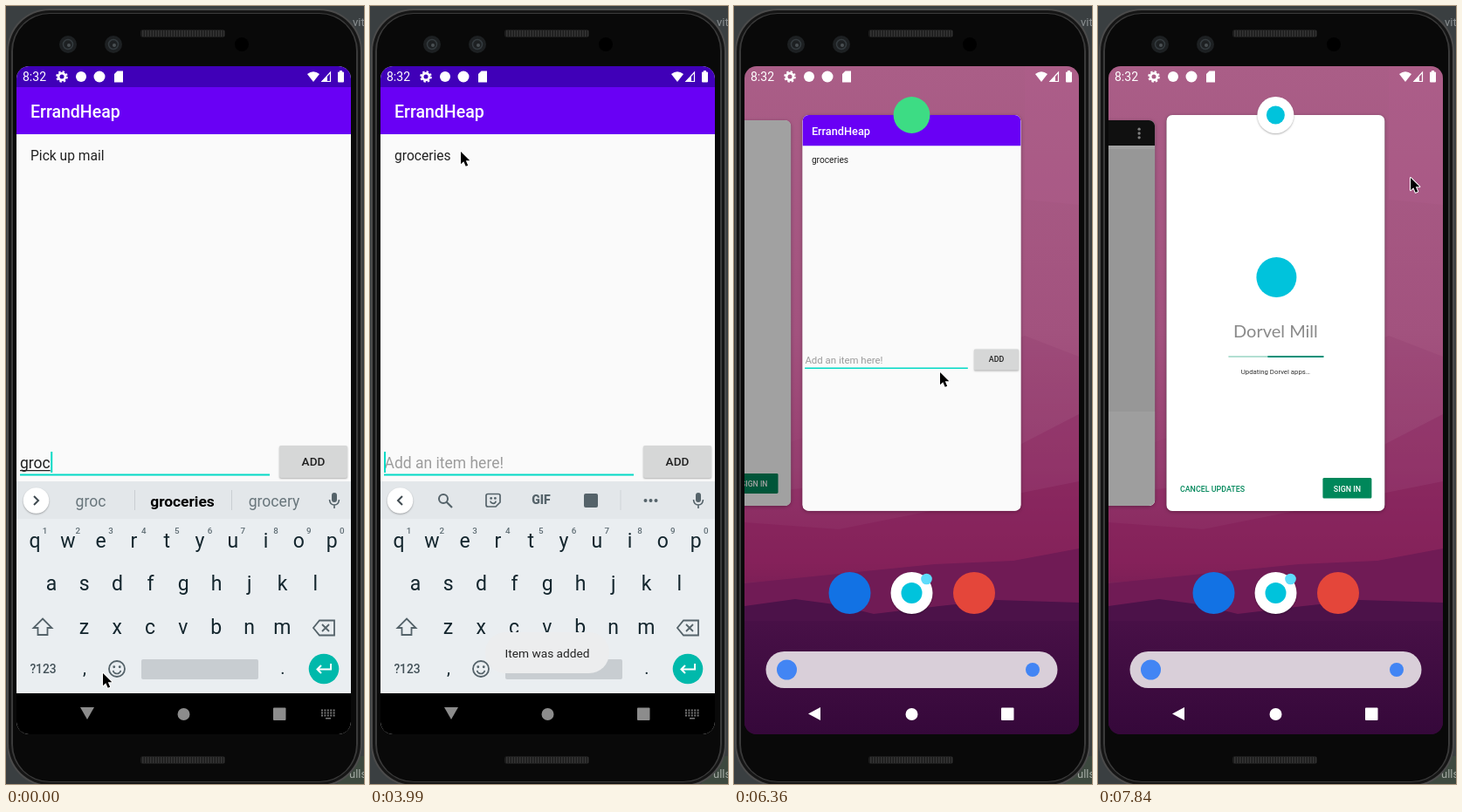
An HTML page with a canvas that plays this animation: 410x892 px, repeating every 7.99 s.

```html
<!DOCTYPE html>
<html lang="en">
<head>
<meta charset="utf-8">
<title>To-do app on a phone</title>
<style>
  html, body { margin: 0; width: 100%; height: 100%; overflow: hidden; background: #3a3f41; }
  canvas { display: block; width: 410px; height: 892px; }
</style>
</head>
<body>
<canvas id="stage"></canvas>
<script>
const LOOP = 7990, TICK = 147.8, LAST_TICK = 53;
const INK = '#212121', KEY = '#14262e', ICON = '#55636a', TEAL = '#03dac5', GREEN = '#00875a';
const canvas = document.getElementById('stage');
const ctx = canvas.getContext('2d');
const ratio = window.devicePixelRatio || 1;
canvas.width = 410 * ratio;
canvas.height = 892 * ratio;

// Drawing helpers
function text(s, x, y, size, color, { weight = 400, align = 'left', family = 'Roboto' } = {}) {
  ctx.font = `${weight} ${size}px ${family}, sans-serif`;
  ctx.textAlign = align;
  ctx.fillStyle = color;
  ctx.fillText(s, x, y);
}
const centered = (s, x, y, size, color, weight) => text(s, x, y, size, color, { weight, align: 'center' });
function fill(path, color) { ctx.fillStyle = color; ctx.fill(new Path2D(path)); }
function line(path, color, width = 2) {
  ctx.strokeStyle = color;
  ctx.lineWidth = width;
  ctx.stroke(new Path2D(path));
}
function rect(x, y, w, h, color, r = 0) {
  ctx.fillStyle = color;
  ctx.beginPath();
  ctx.roundRect(x, y, w, h, r);
  ctx.fill();
}
function disc(x, y, r, color) {
  ctx.fillStyle = color;
  ctx.beginPath();
  ctx.arc(x, y, r, 0, 7);
  ctx.fill();
}
function ring(x, y, r, color, width) {
  ctx.strokeStyle = color;
  ctx.lineWidth = width;
  ctx.beginPath();
  ctx.arc(x, y, r, 0, 7);
  ctx.stroke();
}
function clip(x, y, w, h, r = 0) {
  ctx.beginPath();
  ctx.roundRect(x, y, w, h, r);
  ctx.clip();
}
function scoped(draw) { ctx.save(); draw(); ctx.restore(); }
function shadowed(blur, draw) {
  scoped(() => {
    ctx.shadowColor = 'rgba(0,0,0,.3)';
    ctx.shadowBlur = blur * ratio;
    ctx.shadowOffsetY = ratio;
    draw();
  });
}

// Linear interpolation through [tick, ...values] keys
function track(keys, n) {
  const i = keys.findIndex(k => k[0] > n);
  if (i < 0) return keys.at(-1).slice(1);
  if (i === 0) return keys[0].slice(1);
  const [a, b] = [keys[i - 1], keys[i]], f = (n - a[0]) / (b[0] - a[0]);
  return a.slice(1).map((v, j) => v + (b[j + 1] - v) * f);
}
const POINTER = [
  [6, 111, 765], [9, 235, 640], [11, 358, 521], [14, 358, 520], [15, 290, 440], [16, 174, 349],
  [17, 174, 349], [18, 140, 210], [19, 113, 147], [20, 107, 155], [22, 104, 167], [27, 104, 167],
  [31, 256, 400], [32, 256, 400], [33, 265, 413], [38, 305, 817], [40, 305, 817], [43, 236, 420],
  [44, 236, 420], [45, 236, 397], [46, 237, 304], [47, 238, 163], [49, 280, 50], [51, 308, 16],
  [52, 308, 16], [53, 358, 197]];
const RECENTS = [[39, 0], [40, .016], [41, .4], [42, .85], [43, 1]];
const DISMISS = [[44, 0], [45, .04], [46, .2], [47, .442], [48, .72], [49, .92], [50, 1]];

function phoneBody() {
  rect(0, 0, 410, 892, '#3a3f41');
  rect(380, 860, 30, 32, '#3d493f');
  text('vit', 397, 23, 13, '#8b9092');
  text('ulls', 393, 885, 13, '#a3aaa3');
  rect(1, 3, 407, 892, '#4b4b4b', 49);
  rect(3, 5, 403, 888, '#151515', 47);
  rect(6, 8, 397, 882, '#3a3a3a', 44);
  rect(8, 9, 393, 880, '#090909', 42);
  for (const y of [32, 865]) {
    rect(154, y - 5, 97, 9, '#1c1c1c', 3);
    scoped(() => {
      ctx.setLineDash([1.5, 1.5]);
      line(`M156 ${y - .5}H250`, '#343434', 7);
    });
  }
  for (const x of [71, 123]) {
    disc(x, 44, 10, '#1d2022');
    ring(x, 44, 5.5, '#343b3f', 1.5);
    disc(x + 1, 45, 2, '#4a5053');
  }
  disc(270, 44, 8, '#000');
}

function statusIcons() {
  const white = '#fff';
  text('8:32', 19, 86, 14, white);
  ring(64, 81, 3.9, white, 2.8);
  scoped(() => { ctx.setLineDash([2.4, 2.15]); ring(64, 81, 5.8, white, 2); });
  disc(86, 81, 6, white);
  disc(107, 81, 6.5, white);
  fill('M127.5 74.5H134V87.5H124V78Z', white);
  fill('M345 78Q352 72.5 359 78L352 87Z', white);
  line('M371.5 76V86.5H362Z', white, 1.2);
  fill('M368 80V87H361Z', white);
  rect(380, 75.5, 7, 12, white, 1);
  rect(382, 74, 3, 2, white);
}

function navIcons(n) {
  const color = n < 39 ? '#8c8c8c' : '#fff';
  if (n >= 39 && n < 42) rect(264, 788, 99, 47, 'rgba(255,255,255,.13)', 23);
  fill(n < 43 ? 'M85 804H101L93 818Z' : 'M99 804V819L85 811.5Z', color);
  disc(203.5, 812, 7, color);
  rect(306, 804.5, 14.5, 14.5, color, 1);
  if (n < 40) {
    scoped(() => {
      ctx.setLineDash([2, 1.4]);
      for (const y of [807.5, 810.5, 813.5]) line(`M361 ${y}H377`, '#777', 2);
    });
    rect(366, 816, 6, 1.5, '#777');
  }
}

function smiley(x, y, r) {
  disc(x - r * .36, y - r * .25, 1.4, ICON);
  disc(x + r * .36, y - r * .25, 1.4, ICON);
  ctx.beginPath();
  ctx.arc(x, y + 1, r * .5, .2, Math.PI - .2);
  ctx.strokeStyle = ICON;
  ctx.lineWidth = 1.7;
  ctx.stroke();
}

function suggestionStrip(n, word) {
  rect(12, 545, 383, 43, '#e3e7ea');
  shadowed(2, () => disc(34.5, 567, 14.8, '#fff'));
  line(word ? 'M32 562L37 567L32 572' : 'M37 562L32 567L37 572', '#3f4a50', 2);
  rect(373, 558, 6, 11, ICON, 3);
  line('M370.5 566Q371 572 376 572T381.5 566M376 572V576', ICON, 1.6);
  if (word && n < 5) {
    centered(word, 97, 573.5, 17.6, '#69767c');
    centered('groceries', 202, 573.5, 17.4, '#000', 700);
    centered('grocery', 307, 573.5, 17.6, '#69767c');
    line('M147.5 555V578M258.5 555V578', '#c9ced2', 1);
  } else if (word) {
    centered(word, 202.5, 573.5, 17.6, '#69767c');
  } else {
    ring(84, 565, 5, ICON, 2);
    line('M87.5 568.5L94 575', ICON, 2.2);
    line('M135 559.5H147Q149 559.5 149 561.5V569L144 574H135Q133 574 133 572V561.5Q133 559.5 135 559.5Z', ICON, 1.7);
    smiley(141, 566, 6.5);
    centered('GIF', 196, 571, 14, ICON, 900);
    rect(245, 559, 16, 16, ICON, 2);
    line('M287 555V578', '#cfd4d7', 1);
    for (const x of [315.5, 321.5, 327.5]) disc(x, 567, 2, ICON);
  }
}

function keyboard(n, word) {
  rect(12, 545, 383, 243, '#eaeef1');
  suggestionStrip(n, word);
  const rows = [['qwertyuiop', 33, 621], ['asdfghjkl', 52, 670], ['zxcvbnm', 89.5, 719.5]];
  for (const [keys, x, y] of rows)
    [...keys].forEach((key, i) => centered(key, x + i * 37.8, y, 23, KEY));
  for (let i = 0; i < 10; i++) centered((i + 1) % 10, 44.5 + i * 37.8, 605, 9.8, '#5f6d74', 500);
  line('M42 702.5L52.5 713H47.5V721H36.5V713H31.5Z', ICON, 1.8);
  line('M359 704.5H376V721.5H359L352 713ZM362 709L370 717M370 709L362 717', ICON, 1.8);
  centered('?123', 42.5, 765, 13.8, '#445259', 500);
  centered(',', 90, 766, 20, KEY);
  centered('.', 317, 766, 20, KEY);
  ring(127, 760, 9, ICON, 1.8);
  smiley(127, 760, 9);
  rect(155, 749, 134, 23, '#c8cdd1', 2);
  disc(364, 760, 17.3, '#00b9ab');
  line('M372 754V760.5H357M361 756L356.5 760.5L361 765', '#fff', 2);
}

function toast(message, halfWidth, alpha) {
  scoped(() => {
    ctx.globalAlpha = alpha;
    rect(203 - halfWidth, 718, halfWidth * 2, 47, '#ecedee', 23);
    centered(message, 203, 746.5, 13.7, '#242424');
  });
}

function inputRow(n, word) {
  if (word) {
    text(word, 16, 530, 17.5, INK);
    rect(16, 532, ctx.measureText(word).width, 1.2, INK);
  } else {
    text('Add an item here!', 16.5, 530, 17.5, '#9c9c9c');
  }
  const caret = word ? 16.5 + ctx.measureText(word).width : 16;
  const sinceTyped = n * TICK - 750;
  if (n < 39 && (sinceTyped < 0 || sinceTyped % 1000 < 500)) rect(caret, 511, 2, 24, TEAL);
  rect(16, 536.5, 286, 2, TEAL);

  const pressed = n === 12 || n === 13;
  shadowed(pressed ? 5 : 2, () => rect(313, 504, 78, 37, '#d6d7d7', 2));
  if (pressed) scoped(() => {
    clip(313, 504, 78, 37, 2);
    disc(361, 522, n === 12 ? 27 : 48, '#c3c4c4');
  });
  centered('ADD', 352, 527, 13.6, INK, 500);
}

function app(n) {
  const word = n < 14 ? 'groceries'.slice(0, 4 + Math.min(n, 5)) : '';
  const items = n < 14 ? ['Pick up mail'] : n < 26 ? ['Pick up mail', 'groceries'] : ['groceries'];
  rect(12, 69, 383, 766, '#fafafa');
  rect(12, 93, 383, 54, '#6900f5');
  rect(12, 69, 383, 24, '#4000b8');
  text('ErrandHeap', 28, 127.5, 19.5, '#fff', { weight: 500 });
  items.forEach((item, i) => text(item, 28, 176.5 + i * 46.8, 15.6, INK));
  inputRow(n, word);
  if (n < 43) keyboard(n, word);
  if (n < 43) rect(12, 788, 383, 47, '#000');
  if (n >= 15 && n < 28) toast('Item was added', 71, n === 15 ? .5 : 1);
  if (n >= 28 && n < 40) toast('Item was removed', 80, n === 28 || n === 39 ? .5 : 1);
}

function wallpaper() {
  const sky = ctx.createLinearGradient(0, 69, 0, 835);
  [[0, '#aa5e87'], [.4, '#a2527e'], [.6, '#973f70'], [.75, '#85265c'], [.85, '#5a174d'], [1, '#36083a']]
    .forEach(([stop, color]) => sky.addColorStop(stop, color));
  rect(12, 69, 383, 766, sky);
  fill('M333 69H395V228L333 222Z', 'rgba(175,95,140,.3)');
  fill('M12 520L140 472L215 425L333 378L395 402V560H12Z', 'rgba(145,60,110,.28)');
  fill('M12 560L142 546L240 522L310 512L395 468V640H12Z', 'rgba(138,38,95,.4)');
  fill('M12 592L120 600L250 574L395 545V660H12Z', 'rgba(128,28,84,.45)');
  fill('M12 662L110 652L230 640L320 636L395 622V720H12Z', '#701b55');
  fill('M12 688L70 680L115 686L160 697L235 688L300 681L395 684V760H12Z', '#4c1249');
  const ground = ctx.createLinearGradient(0, 690, 0, 835);
  ground.addColorStop(0, '#4a1148');
  ground.addColorStop(1, '#35083a');
  rect(12, 705, 383, 130, ground);
}

function storeIcon(x, y, r) {
  shadowed(2, () => disc(x, y, r, '#fff'));
  disc(x, y, r * .5, '#00c3dc');
}

function dock() {
  disc(132.5, 673, 24, '#1272e4');
  storeIcon(203.5, 673, 24);
  disc(220.5, 657, 6.3, '#5edcfb');
  disc(275, 673, 24, '#e4463a');
  rect(36.5, 740, 334, 42, '#d9cfd9', 21);
  disc(60.5, 761, 11.5, '#4285f4');
  disc(342, 761, 8, '#4285f4');
}

function storeCard() {
  rect(0, 0, 250, 454, '#fff');
  disc(126, 186, 23, '#00c3dc');
  text('Dorvel Mill', 125, 255, 20, '#8a8a8a', { align: 'center', family: 'Lato' });
  rect(71, 276, 109, 2, '#b2dfd2');
  rect(116, 276, 64, 2, '#00917a');
  centered('Updating Dorvel apps…', 125, 297, 7.8, '#333');
  text('CANCEL UPDATES', 15.5, 431.5, 8.9, GREEN, { weight: 500 });
  rect(179, 416, 56, 23.5, GREEN, 1.5);
  centered('SIGN IN', 207, 431.5, 8.9, '#fff', 500);
}

function plainCard() {
  rect(0, 0, 250, 454, '#efefef');
  rect(0, 0, 250, 30, '#1a1a1a');
  rect(0, 30, 250, 4, '#fff');
  rect(0, 343, 250, 111, '#fafafa');
  for (const y of [10.5, 15.5, 20.5]) disc(231.5, y, 1.7, '#c8c8c8');
}

// A recents card lying `distance` places left of the middle
function recentCard(content, distance, icon) {
  const near = Math.min(distance, 1);
  scoped(() => {
    ctx.translate(203.4 - 260 * distance, 352);
    ctx.scale(1 - .026 * near, 1 - .026 * near);
    ctx.translate(-125, -227);
    shadowed(4, () => rect(0, 0, 250, 454, '#999', 7));
    scoped(() => {
      clip(0, 0, 250, 454, 7);
      content();
      rect(0, 0, 250, 454, `rgba(0,0,0,${.37 * near})`);
    });
    if (icon) icon();
  });
}

function appWindow(n, q, p) {
  const top = 69 + 24 * q, height = 766 - 71 * q, radius = 14 - 3 * q;
  scoped(() => {
    ctx.globalAlpha = 1 - p ** 3;
    ctx.translate(203.5, 69 + 56 * q - p * 581);
    ctx.scale(1 - .347 * q, 1 - .347 * q);
    ctx.translate(-203.5, -top);
    if (q === 1) shadowed(4, () => rect(12, top, 383, height, '#fafafa', radius));
    scoped(() => {
      clip(12, top, 383, height, radius);
      app(n);
    });
    if (q === 1) disc(203.5, top, 32, '#3ddc84');
  });
}

function pointer(x, y) {
  scoped(() => {
    ctx.translate(x, y);
    const arrow = 'M0 0V14.2L3.3 11.2L5.7 16.8L8.2 15.7L5.8 10.3H10.3Z';
    ctx.lineJoin = 'round';
    line(arrow, '#fff', 2);
    fill(arrow, '#000');
  });
}

function draw(time) {
  const n = Math.min(LAST_TICK, Math.floor((time % LOOP + 15) / TICK));
  const [q] = track(RECENTS, n), [p] = track(DISMISS, n);
  ctx.setTransform(ratio, 0, 0, ratio, 0, 0);
  phoneBody();
  scoped(() => {
    clip(12, 69, 383, 766, 14);
    if (q > 0) {
      wallpaper();
      scoped(() => { ctx.globalAlpha = q; dock(); });
      const shift = p ** 1.5 - (1 - q);
      recentCard(plainCard, 2 - shift);
      recentCard(storeCard, 1 - shift, () => storeIcon(125, 0, 21));
    }
    if (p < 1) appWindow(n, q, p);
    statusIcons();
    navIcons(n);
  });
  pointer(...track(POINTER, n));
}

const start = performance.now();
function loop() {
  draw(performance.now() - start);
  requestAnimationFrame(loop);
}
loop();
</script>
</body>
</html>
```
